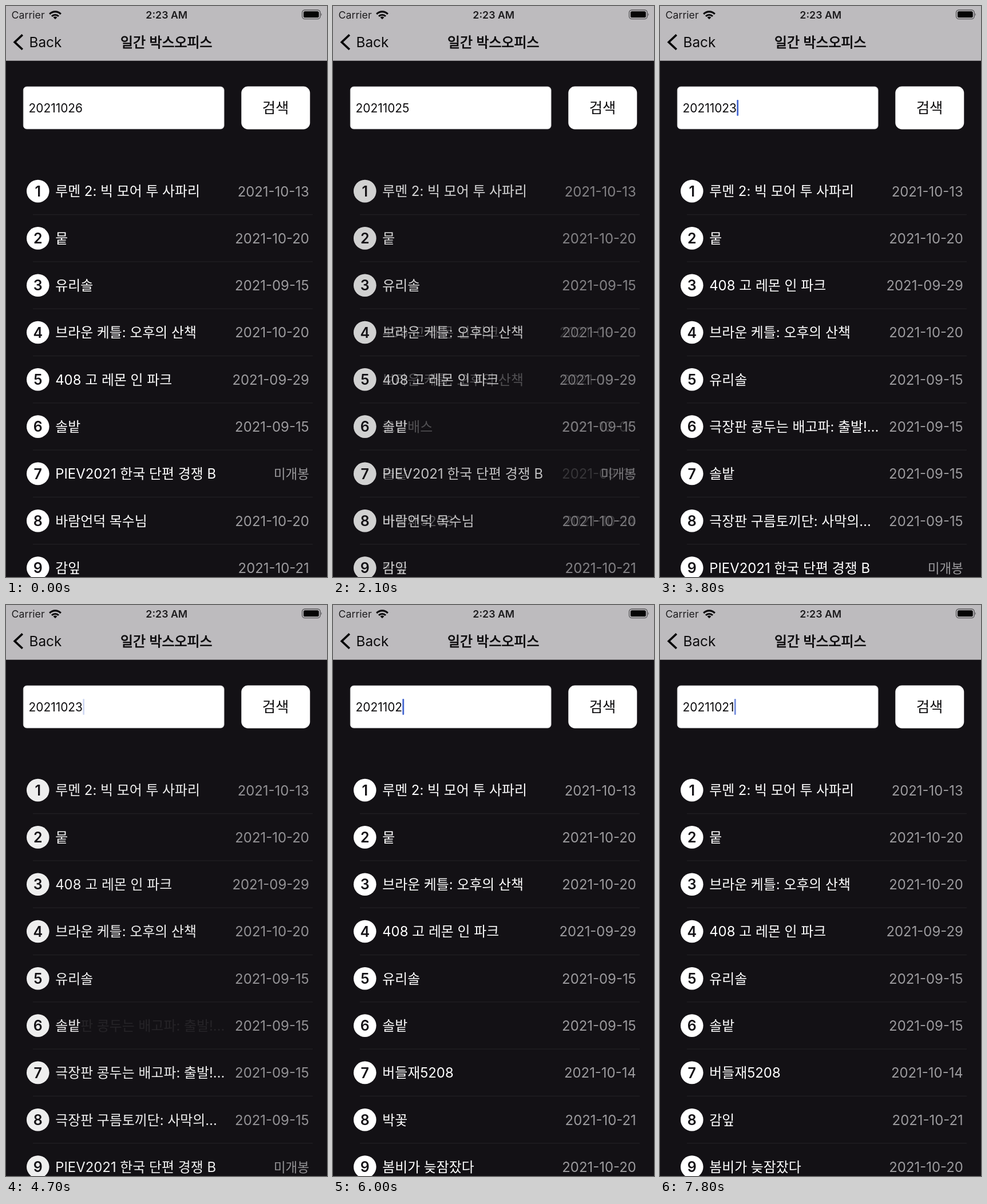
Write an HTML page that moves like this. It is 561 by 998 pixels and loops after 8.3 s.

```html
<!DOCTYPE html>
<html lang="ko">
<head>
<meta charset="utf-8">
<title>일간 박스오피스</title>
<style>
  html, body { margin: 0; width: 100%; height: 100%; overflow: hidden; background: #131115; }
  svg { display: block; width: 100%; height: 100%; }
  text { font-family: Inter, "Noto Sans CJK KR", "Noto Sans CJK", sans-serif; white-space: pre; }
  .status { font-size: 17.8px; fill: #1d1c1e; }
  .bold { font-weight: 600; }
  .mid { text-anchor: middle; }
  .title { font-size: 23.9px; fill: #0c0b0d; stroke: #0c0b0d; stroke-width: 0.8; }
  .rank { font-size: 25px; font-weight: 600; fill: #131115; text-anchor: middle; }
  .name { font-size: 23.9px; fill: #fff; }
  .date { font-size: 23.9px; fill: #9c9b9e; text-anchor: end; }
  .pending { font-size: 22.4px; }
</style>
</head>
<body>
<svg id="stage" viewBox="0 0 561 998">
  <rect width="561" height="998" fill="#131115"/>
  <g id="lines" fill="#201e22"></g>
  <g id="lists"></g>

  <rect width="561" height="95.7" fill="#bdbbbe"/>
  <text class="status" x="9.5" y="21.7">Carrier</text>
  <g fill="none" stroke="#0c0b0d" stroke-width="3.2">
    <path d="M76.2 14.2A13.4 13.4 0 0 1 95.8 14.2"/>
    <path d="M80 18A8.4 8.4 0 0 1 92 18"/>
  </g>
  <path d="M86 23.3L82.6 19.9A4.8 4.8 0 0 1 89.4 19.9Z" fill="#0c0b0d"/>
  <text class="status bold mid" x="280.8" y="21.7">2:23 AM</text>
  <rect x="517.6" y="7" width="31.6" height="15.6" rx="4.6" fill="none" stroke="#59585b" stroke-width="1.4"/>
  <rect x="520" y="9.3" width="26.8" height="11" rx="2.6" fill="#050505"/>
  <path d="M550.6 12.2Q553 14.8 550.6 17.4Z" fill="#59585b"/>

  <path d="M28.8 50.4L15.2 63.2L28.8 76" fill="none" stroke="#060607" stroke-width="3.7"/>
  <text x="40.5" y="71.7" font-size="24.3" fill="#0c0b0d">Back</text>
  <text class="title mid" x="280.2" y="71.6">일간 박스오피스</text>

  <rect x="30.3" y="141" width="350.8" height="73.9" rx="6" fill="#fff" stroke="#cfced1" stroke-width="0.8"/>
  <rect x="411.3" y="140.6" width="120" height="74.8" rx="11.5" fill="#fff"/>
  <text class="mid" x="471" y="187.4" font-size="25.4" fill="#0c0b0d">검색</text>
  <text id="query" x="39.5" y="185.8" font-size="20.9" fill="#0c0b0d"></text>
  <rect id="caret" y="164" width="2.8" height="28" rx="1.2" fill="#4466d0"/>
</svg>
<script>
const LOOP = 8300, STEP = 100, FADE = 300, ROW = 82.3, TOP = 323.6;

const films = {
  a: ['루멘 2: 빅 모어 투 사파리', '2021-10-13'],
  b: ['뭍', '2021-10-20'],
  c: ['유리솔', '2021-09-15'],
  d: ['브라운 케틀: 오후의 산책', '2021-10-20'],
  e: ['408 고 레몬 인 파크', '2021-09-29'],
  f: ['솔밭', '2021-09-15'],
  g: ['PIEV2021 한국 단편 경쟁 B', '미개봉'],
  h: ['바람언덕 목수님', '2021-10-20'],
  i: ['감잎', '2021-10-21'],
  j: ['코럴배스', '2021-10-06'],
  k: ['버들재5208', '2021-10-14'],
  l: ['박꽃', '2021-10-21'],
  m: ['극장판 콩두는 배고파: 출발!…', '2021-09-15'],
  n: ['극장판 구름토끼단: 사막의…', '2021-09-15'],
  o: ['봄비가 늦잠잤다', '2021-10-20']
};

// Each ranking and the time its cross-fade begins.
const rankings = [
  ['abcdefghi', -FADE], ['abcedjfkl', 2000], ['abedcmfng', 3280],
  ['abedcfmng', 4450], ['abdecfklo', 5500], ['abdecfkio', 6250]
];

// Last digit of the search date, empty while it is being retyped.
const edits = [
  [0, '6'], [1100, ''], [1400, '5'], [2600, ''], [2700, '4'], [3700, ''],
  [3800, '3'], [5100, ''], [5200, '2'], [6000, ''], [6100, '1']
];

// Spans in which the caret is blinked off.
const blinks = [
  [-100, 400], [1900, 2300], [3300, 3700], [4400, 4700],
  [5700, 6000], [6300, 6600], [7300, 7600]
];

const byId = id => document.getElementById(id);

function add(parent, tag, attrs, text = '') {
  const node = document.createElementNS('http://www.w3.org/2000/svg', tag);
  for (const key in attrs) node.setAttribute(key, attrs[key]);
  node.textContent = text;
  return parent.appendChild(node);
}

function buildList(keys) {
  const group = add(byId('lists'), 'g', {});
  [...keys].forEach((key, i) => {
    const y = TOP + ROW * i;
    const [name, date] = films[key];
    const dateClass = date === '미개봉' ? 'date pending' : 'date';
    add(group, 'circle', { cx: 55.8, cy: y, r: 19.8, fill: '#fff' });
    add(group, 'text', { class: 'rank', x: 55.8, y: y + 9.1 }, i + 1);
    add(group, 'text', { class: 'name', x: 86.2, y: y + 8.8 }, name);
    add(group, 'text', { class: dateClass, x: 529.8, y: y + 8.9 }, date);
  });
  return group;
}

for (let i = 0; i < 8; i++) {
  add(byId('lines'), 'rect', { x: 47, y: 363.9 + ROW * i, width: 489, height: 1.4 });
}
const lists = rankings.map(([keys]) => buildList(keys));

const latest = (events, t) => events.filter(([at]) => at <= t).pop();
const ease = p => p * p * (3 - 2 * p);

function fadeIn(index, t) {
  if (index >= rankings.length) return 0;
  return ease(Math.min(1, Math.max(0, (t - rankings[index][1]) / FADE)));
}

function caretOpacity(t, editedAt) {
  const [off, on] = latest(blinks, t);
  if (t < on) return t - off < STEP ? 0.5 : 0;
  return editedAt >= on ? 1 : Math.min(0.75, (t - on + STEP) / 400);
}

function render(t) {
  lists.forEach((list, i) => {
    const opacity = fadeIn(i, t) * (1 - fadeIn(i + 1, t));
    list.style.opacity = opacity;
    list.style.display = opacity ? '' : 'none';
  });
  const [editedAt, digit] = latest(edits, t);
  const query = byId('query'), caret = byId('caret');
  query.textContent = '2021102' + digit;
  caret.setAttribute('x', 39.8 + query.getComputedTextLength());
  caret.style.opacity = caretOpacity(t, editedAt);
}

const start = performance.now();
function tick() {
  const t = (performance.now() - start) % LOOP;
  render(Math.floor(t / STEP) * STEP);
  requestAnimationFrame(tick);
}
tick();
</script>
</body>
</html>
```
